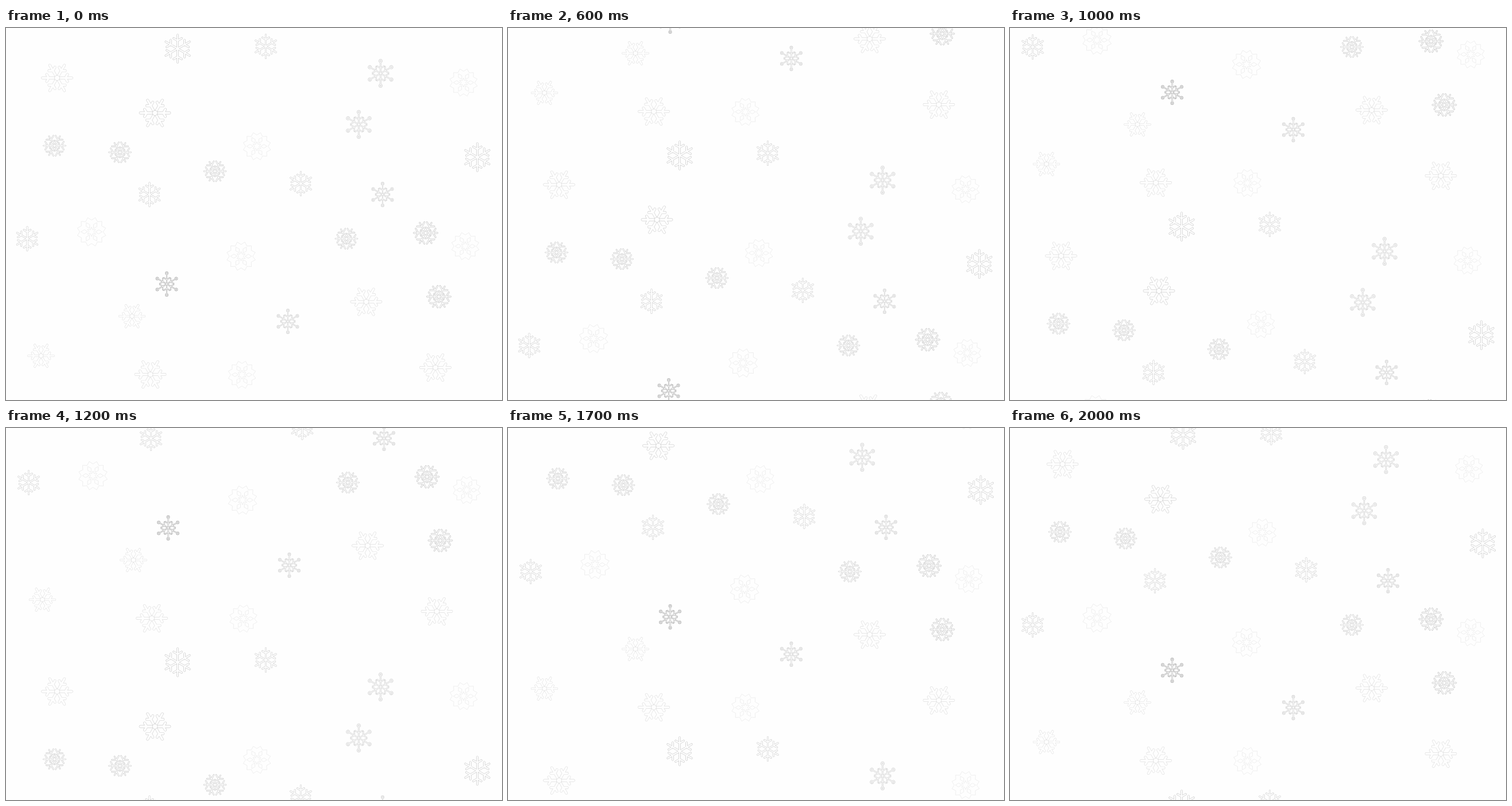
Animation, 864 px wide and 648 px high, one loop 2100 ms. Source, as an HTML page:

```html
<!DOCTYPE html>
<html lang="en">
<head>
<meta charset="utf-8">
<title>Falling snow</title>
<style>
  html, body { margin: 0; width: 100%; height: 100%; overflow: hidden; background: #fefefe; }
  svg { display: block; width: 864px; height: 648px; overflow: hidden; }
  path { fill: none; stroke-linecap: round; stroke-linejoin: round; }
</style>
</head>
<body>
<svg viewBox="0 0 864 648"><g id="snow"><g id="sheet"></g></g></svg>
<script>
const STEP_MS = 100, STEPS = 21, FALL = 31;
const COPY = 'translate(2.5 -644)';
const PAPER = '#fefefe', EDGE = 0.65;

const range = n => [...Array(n).keys()];
const polar = (r, deg) => [r * Math.cos(deg * Math.PI / 180), r * Math.sin(deg * Math.PI / 180)];
const polygon = pts => 'M' + pts.map(p => p.map(v => v.toFixed(2)).join(' ')).join('L') + 'Z';
const circle = (r, [x, y] = [0, 0]) => polygon(range(16).map(i => {
  const [dx, dy] = polar(r, i * 22.5);
  return [x + dx, y + dy];
}));
const star = (points, outer, inner) =>
  polygon(range(2 * points).map(i => polar(i % 2 ? inner : outer, (i + 1) * 180 / points)));

// Six arms, each with pairs of 60-degree twigs given as [distance, length].
function arms(base, reach, twigs) {
  return range(6).map(k => {
    const a = base + 60 * k;
    const [tx, ty] = polar(reach, a);
    return `M0 0L${tx} ${ty}` + twigs.map(([at, len]) => {
      const [x, y] = polar(at, a);
      return [-60, 60].map(turn => `M${x} ${y}l${polar(len, a + turn).join(' ')}`).join('');
    }).join('');
  }).join('');
}

const beads = range(6).map(k => circle(2.2, polar(21.6, 90 + 60 * k))).join('');
const leaves = range(6).map(k => 60 * k).map(a =>
  polygon([polar(7, a), polar(13, a - 15), polar(18, a), polar(13, a + 15)])).join('');

// width: body thickness; detail: thin lines on top; the last flake of a kind takes the accent tone.
// The first `split` flakes have the first size, the others the second.
const kinds = [
  { body: arms(90, 24, [[14, 8]]), width: 3.6, tone: '#c8c8c8', split: 2, sizes: [1, .85],
    at: [[299, 36], [821, 225], [452.5, 32], [513.5, 271], [250, 290], [37, 367]] },
  { body: arms(0, 25.5, [[14.5, 7]]), width: 4.8, detail: circle(4.5), tone: '#dedede', accent: '#d0d0d0',
    split: 2, sizes: [.85, 1],
    at: [[219.5, 502], [61, 571], [89, 87], [627.5, 477], [251.5, 603.5], [748, 591.5], [259.5, 148]] },
  { body: arms(90, 19, [[9, 7]]) + beads, width: 2.4, tone: '#cacaca', accent: '#a4a4a4', split: 2, sizes: [1, .88],
    at: [[652.5, 79], [614.5, 168], [656, 290], [491, 511], [280, 446]] },
  { body: arms(0, 19, [[6, 4], [12, 8]]), width: 2.6, tone: '#c8c8c8', split: 4, sizes: [1, 1.08],
    at: [[84.5, 205], [198.5, 216.5], [364, 249.5], [593, 367], [731, 357], [754, 468]] },
  { detail: star(12, 25, 20) + leaves + star(6, 8, 4), tone: '#ebebeb', split: 2, sizes: [1.02, .98],
    at: [[149, 355], [409.5, 397.5], [797, 95], [437, 206], [800, 380], [411, 604]] }
];

const line = (d, color, width) => `<path d="${d}" stroke="${color}" stroke-width="${width}"/>`;

function drawKind({ body, width, detail, tone, accent, split, sizes, at }) {
  return at.map(([x, y], i) => {
    const color = accent && i === at.length - 1 ? accent : tone;
    const size = sizes[i < split ? 0 : 1];
    const outline = body ? line(body, color, width) + line(body, PAPER, width - 2 * EDGE) : '';
    const inner = detail ? line(detail, color, .8) : '';
    return `<g transform="translate(${x} ${y}) scale(${size})">${outline}${inner}</g>`;
  }).join('');
}

const snow = document.getElementById('snow');
const sheet = document.getElementById('sheet');
sheet.innerHTML = kinds.map(drawKind).join('');
const above = sheet.cloneNode(true);
above.removeAttribute('id');
above.setAttribute('transform', COPY);
snow.append(above);

const start = performance.now();
function draw(now) {
  const step = Math.floor(Math.max(0, now - start) / STEP_MS) % STEPS;
  snow.setAttribute('transform', `translate(0 ${step * FALL})`);
  requestAnimationFrame(draw);
}
draw(start);
</script>
</body>
</html>
```
